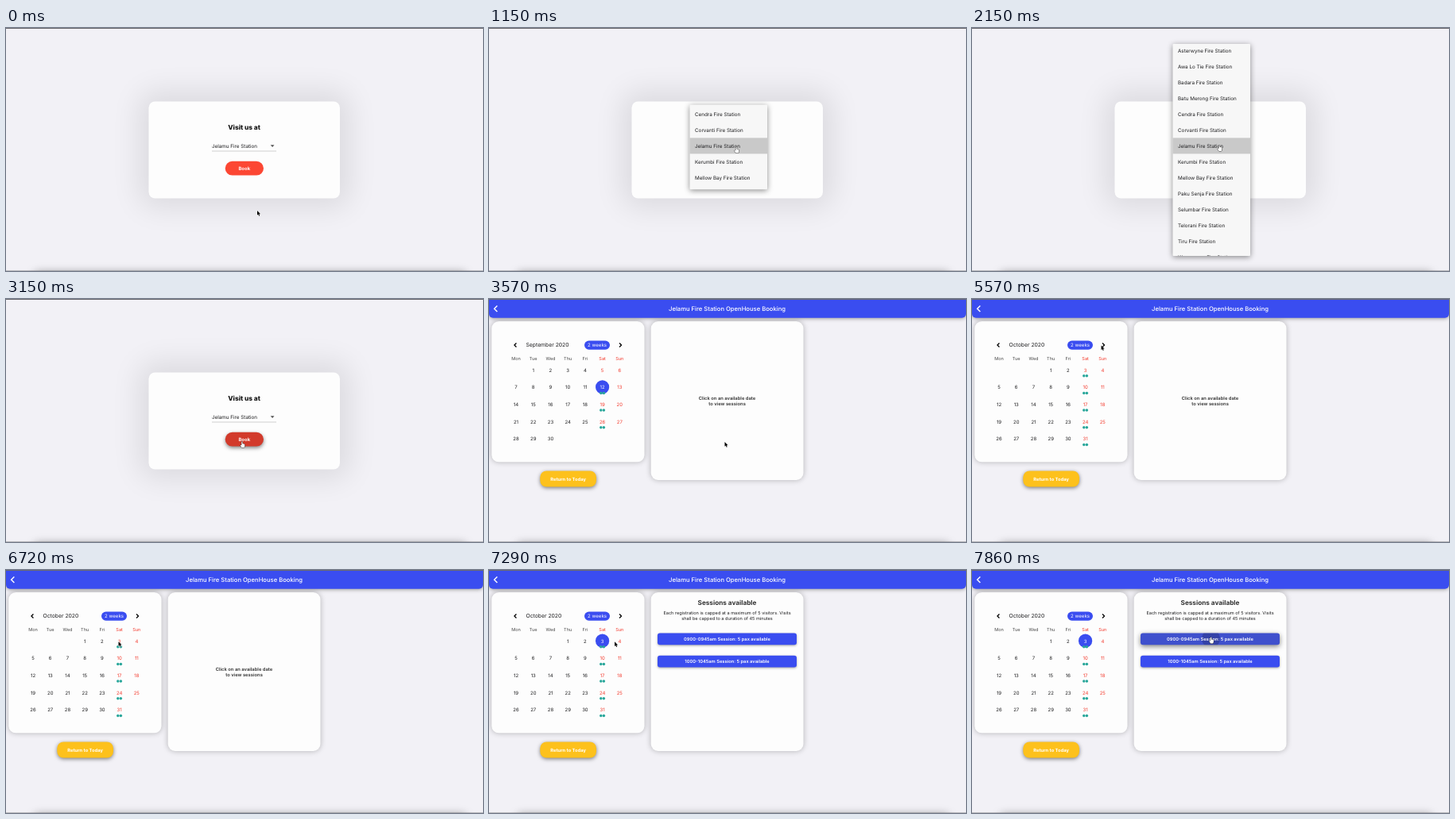
Animation, 600 px wide and 306 px high, one loop 8000 ms. Source, as an HTML page with a canvas:

```html
<!DOCTYPE html>
<html lang="en">
<head>
<meta charset="utf-8">
<title>Open house booking</title>
<style>
html, body { margin: 0; width: 100%; height: 100%; overflow: hidden; background: #f2f1f6; }
canvas { display: block; width: 600px; height: 306px; }
</style>
</head>
<body>
<canvas id="stage" width="600" height="306"></canvas>
<script>
const ctx = document.getElementById('stage').getContext('2d');
const LOOP = 8000;
const BLUE = '#3a4df0', RED = '#f3392c', INK = '#1c1c1e', PAPER = '#fdfdfd';
const STATION = 'Jelamu Fire Station';
const AREAS = ['Asterwyne', 'Awa Lo Tie', 'Badara', 'Batu Merong', 'Cendra', 'Corvanti', 'Jelamu',
  'Kerumbi', 'Mellow Bay', 'Paku Senja', 'Selumbar', 'Telorani', 'Tiru', 'Wrenmoors'];
const SELECTED = 6;
const WEEKDAYS = ['Mon', 'Tue', 'Wed', 'Thu', 'Fri', 'Sat', 'Sun'];
const MONTHS = {
  september: { label: 'September 2020', first: 1, days: 30, open: [12, 19, 26] },
  october: { label: 'October 2020', first: 3, days: 31, open: [3, 10, 17, 24, 31] }
};

// Pointer keyframes: tick, x, y
const PATH = [[0, 316, 230], [1, 317, 231], [2, 317, 231], [6, 311, 151], [10, 311, 148],
  [13, 313, 182], [15, 311, 147], [17, 311, 147], [21, 297, 179], [25, 296.5, 180],
  [32, 163, 56], [33, 163.5, 57], [38, 163.5, 57], [46, 141.5, 90], [50, 141.5, 91],
  [55, 300.5, 84.5]];
const ARROW = new Path2D('M0 0V5.8L1.3 4.6L2.2 6.7L3.2 6.2L2.3 4.2H4.1Z');
const HAND = new Path2D('M-.6 .6Q0 -.2 .6 .6V3Q3.3 3 3.4 4.2V6L2.7 8H-.4L-2.2 5.2Q-2 4.1 -.6 5Z');

const lerp = (a, b, t) => a + (b - a) * t;
const smooth = t => t * t * (3 - 2 * t);

function pointerAt(tick) {
  const i = PATH.findIndex(p => p[0] >= tick);
  if (i <= 0) return PATH[0].slice(1);
  const [t0, x0, y0] = PATH[i - 1], [t1, x1, y1] = PATH[i];
  const t = smooth((tick - t0) / (t1 - t0));
  return [lerp(x0, x1, t), lerp(y0, y1, t)];
}

function text(str, x, y, size, { color = INK, weight = 400, align = 'center' } = {}) {
  ctx.font = `${weight} ${size}px Inter, "Open Sans", sans-serif`;
  ctx.textRendering = 'geometricPrecision';
  ctx.textAlign = align;
  ctx.fillStyle = color;
  ctx.fillText(str, x, y + size * 0.36);
}

function box(x, y, w, h, r, fill) {
  ctx.fillStyle = fill;
  ctx.beginPath();
  ctx.roundRect(x, y, w, h, r);
  ctx.fill();
}

// Draws only the shadow, by casting it from a shape outside the stage
function shadow(x, y, w, h, r, blur, alpha, dy = 0) {
  ctx.save();
  ctx.shadowColor = `rgba(0,0,0,${alpha})`;
  ctx.shadowBlur = blur;
  ctx.shadowOffsetX = 2000;
  ctx.shadowOffsetY = dy;
  box(x - 2000, y, w, h, r, '#000');
  ctx.restore();
}

function line(points, color, width) {
  ctx.strokeStyle = color;
  ctx.lineWidth = width;
  ctx.beginPath();
  points.forEach(([x, y]) => ctx.lineTo(x, y));
  ctx.stroke();
}

function chevron(x, y, size, dir, color, width) {
  line([[x - dir * size / 2, y - size], [x + dir * size / 2, y], [x - dir * size / 2, y + size]], color, width);
}

function dot(x, y, r, fill) {
  ctx.fillStyle = fill;
  ctx.beginPath();
  ctx.arc(x, y, r, 0, Math.PI * 2);
  ctx.fill();
}

function backdrop() {
  ctx.fillStyle = '#f2f1f6';
  ctx.fillRect(0, 0, 600, 306);
}

function windowEdges() {
  ctx.fillStyle = '#6b6b70';
  ctx.fillRect(0, 0, 600, 1);
  shadow(36, 308, 542, 20, 4, 12, 0.4);
  ctx.fillStyle = 'rgba(120,120,125,.45)';
  ctx.fillRect(0, 305, 600, 1);
}

function visitPage(hovered) {
  shadow(168, 80, 264, 146, 20, 36, 0.095);
  box(179.5, 92.5, 240.5, 122, 8, PAPER);
  text('Visit us at', 299.5, 125.5, 8.3, { weight: 800, color: '#111' });
  text(STATION, 259, 148.5, 6.3, { align: 'left' });
  line([[259, 155], [340, 155]], '#bbb', 0.7);
  ctx.fillStyle = '#555';
  ctx.beginPath();
  ctx.moveTo(332.7, 147.3);
  ctx.lineTo(337.5, 147.3);
  ctx.lineTo(335.1, 149.9);
  ctx.fill();
  if (hovered) shadow(276, 168, 48, 17.5, 9, 5, 0.5, 2);
  box(275.7, 167.8, 48.3, 17.7, 8.85, hovered ? '#d23a2b' : '#fc4733');
  text('Book', 299.8, 176.8, 6, { weight: 700, color: '#fff' });
}

function menu(open, alpha, hoverRow) {
  const top = lerp(138, 20, open), bottom = lerp(158, 287, open);
  ctx.save();
  ctx.globalAlpha = alpha;
  shadow(252.5, top, 97.5, bottom - top, 1, 7, 0.45, 1.5);
  box(252.5, top, 97.5, bottom - top, 1, '#f7f7f7');
  ctx.beginPath();
  ctx.rect(252.5, top, 97.5, bottom - top);
  ctx.clip();
  AREAS.forEach((area, i) => {
    const y = 28.4 + i * 20;
    if (i === SELECTED || i === hoverRow) {
      ctx.fillStyle = i !== SELECTED ? '#ececec' : i === hoverRow ? '#c9c9c9' : '#d8d8d8';
      ctx.fillRect(252, y - 10, 99, 20);
    }
    text(`${area} Fire Station`, 259, y, 6.3, { align: 'left' });
  });
  ctx.restore();
}

function calendar(month, selected, slide) {
  text(month.label, 46.5, 58, 6.8, { align: 'left' });
  chevron(33.2, 58, 2.5, -1, '#000', 1.3);
  chevron(165.3, 58, 2.5, 1, '#000', 1.3);
  box(120, 52.5, 32, 11.2, 5.6, BLUE);
  text('2 weeks', 136, 58.1, 6.1, { color: '#fff' });

  ctx.save();
  ctx.beginPath();
  ctx.rect(23.3, 66, 152.2, 125);
  ctx.clip();
  ctx.translate(slide, 0);
  const colX = c => 34 + c * 21.72;
  WEEKDAYS.forEach((name, c) => text(name, colX(c), 75.2, 5.6, { color: c > 4 ? RED : '#4a4a4a' }));
  for (let day = 1; day <= month.days; day++) {
    const cell = month.first + day - 1, c = cell % 7;
    const x = colX(c), y = 89.5 + Math.floor(cell / 7) * 21.7;
    const active = day === selected;
    if (active) dot(x, y - 0.3, 8.6, BLUE);
    text(day, x, y, 6, { color: active ? '#fff' : c > 4 ? RED : INK });
    if (month.open.includes(day)) [-1.8, 1.8].forEach(dx => dot(x + dx, y + 7.2, 1.75, '#2aa79b'));
  }
  ctx.restore();
}

function sessionButton(label, y, hovered, ripple) {
  shadow(212, y, 175, 14.8, 3, hovered ? 6 : 3, hovered ? 0.5 : 0.35, hovered ? 2 : 1);
  box(212, y, 175, 14.8, 3, hovered ? '#3f50cd' : BLUE);
  if (ripple) {
    ctx.save();
    ctx.beginPath();
    ctx.rect(212, y, 175, 14.8);
    ctx.clip();
    dot(300.5, y + 7, 11.5, 'rgba(25,30,80,.3)');
    ctx.restore();
  }
  text(label, 299.5, y + 7.6, 5.75, { weight: 600, color: '#fff' });
}

function sessions(tick) {
  text('Sessions available', 299.5, 41.5, 8.2, { weight: 700, color: '#333' });
  text('Each registration is capped at a maximum of 5 visitors. Visits', 299.5, 54, 5.6);
  text('shall be capped to a duration of 45 minutes', 299.5, 61, 5.6);
  sessionButton('0900-0945am Session: 5 pax available', 79.4, tick >= 53, tick >= 55);
  sessionButton('1000-1045am Session: 5 pax available', 107.7, false, false);
}

function panel(x, y, w, h) {
  shadow(x, y, w, h, 9, 7, 0.27);
  box(x, y, w, h, 9, PAPER);
}

function header() {
  shadow(0, 1, 600, 22.5, 5, 5, 0.4, 1);
  box(0, 0, 600, 23.7, [0, 0, 5, 5], BLUE);
  chevron(8.5, 12.3, 3.8, -1, '#fff', 1.4);
  text(`${STATION} OpenHouse Booking`, 299.5, 12.6, 7.65, { weight: 500, color: '#fff' });
}

function bookingPage(tick) {
  const october = tick >= 35, booked = tick >= 49;
  panel(3.3, 28, 192.2, 177.3);
  panel(203.7, 28, 191.8, 200);

  // The new month glides in over 350 ms, decelerating
  const progress = Math.min(1, 0.475 + (tick - 35) / 7 / 0.35);
  const slide = october ? 182 * (1 - progress) ** 2 : 0;
  calendar(october ? MONTHS.october : MONTHS.september, october ? (booked ? 3 : 0) : 12, slide);

  if (booked) {
    sessions(tick);
  } else {
    text('Click on an available date', 299.5, 125, 5.85, { weight: 600, color: '#333' });
    text('to view sessions', 299.5, 132, 5.85, { weight: 600, color: '#333' });
  }
  shadow(64.5, 216.5, 70.5, 20, 8, 5, 0.5, 1.5);
  box(64.3, 216.5, 70.7, 20, 8, '#fdc11c');
  text('Return to Today', 99.6, 226.5, 5.8, { weight: 700, color: '#fff' });
  header();
}

function pointer(tick, x, y) {
  const hand = (tick >= 6 && tick <= 18) || (tick >= 21 && tick <= 24) || tick >= 53;
  ctx.save();
  ctx.translate(x, y);
  ctx.lineJoin = 'round';
  ctx.lineWidth = hand ? 0.8 : 0.9;
  ctx.strokeStyle = hand ? '#111' : '#fff';
  ctx.fillStyle = hand ? '#fff' : '#000';
  const shape = hand ? HAND : ARROW;
  ctx.stroke(shape);
  ctx.fill(shape);
  ctx.restore();
}

function draw(tick) {
  const [x, y] = pointerAt(tick);
  backdrop();
  if (tick < 25) {
    visitPage(tick >= 21);
    if (tick >= 8 && tick <= 17) {
      const open = tick === 8 ? 0.35 : tick === 9 ? 0.8 : 1;
      menu(open, tick === 17 ? 0.5 : 1, Math.floor((y + 2 - 18) / 20));
    }
  } else {
    bookingPage(tick);
  }
  windowEdges();
  pointer(tick, x, y);
}

// Seven pictures a second, on a clock of hundredths; the small bias sets the rounding
function frame() {
  const hundredths = Math.floor(performance.now() % LOOP / 10);
  draw(Math.floor((hundredths + 0.2) * 7 / 100));
  requestAnimationFrame(frame);
}
frame();
</script>
</body>
</html>
```
